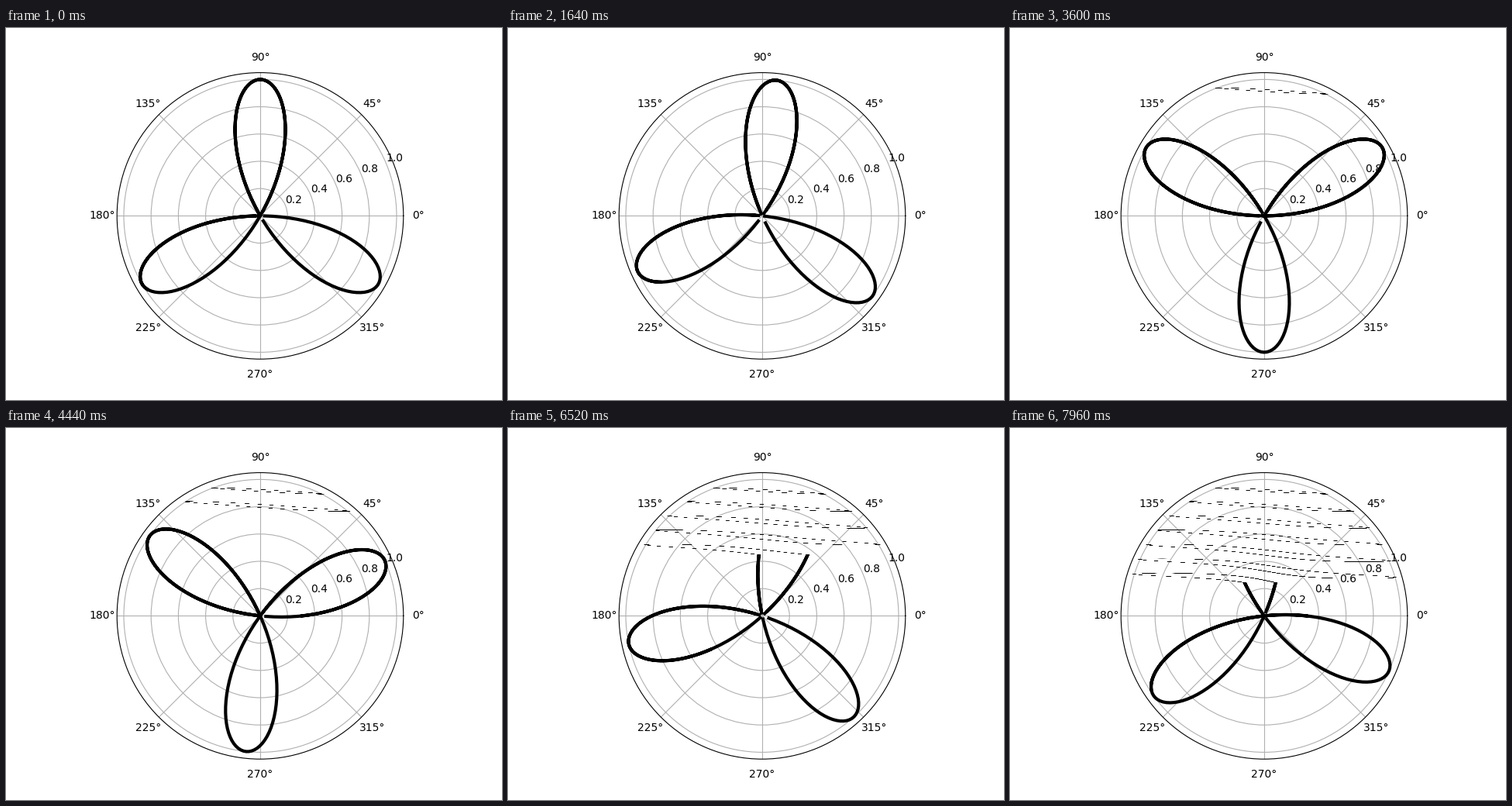
Recreate the animation shown at these times as a matplotlib script. Size 640 by 480 pixels, loop 8000 ms.

```python
import matplotlib.pyplot as plt
import numpy as np
from matplotlib.animation import FuncAnimation
from matplotlib.path import Path

WIDTH, HEIGHT, DPI = 640, 480, 100
FRAMES, INTERVAL = 200, 40
CYCLE = 20  # frames until the rose repeats

theta = np.linspace(0, 10, 500)


def rose(step):
    """Three-petalled rose, turning 6 degrees clockwise per step."""
    r = np.round(-np.sin(3 * theta + 2 * np.pi * step / CYCLE), 9)
    return np.where(r >= 0, r, np.nan)


def bands(spans):
    """Full-width strips between pixel rows, in figure coordinates."""
    polys = []
    for top, bottom in spans:
        y0, y1 = 1 - bottom / HEIGHT, 1 - top / HEIGHT
        polys.append([(0, y0), (1, y0), (1, y1), (0, y1)])
    return Path.make_compound_path_from_polys(np.array(polys))


fig = plt.figure(figsize=(WIDTH / DPI, HEIGHT / DPI), dpi=DPI)
ax = fig.add_subplot(projection="polar")
ax.set_ylim(0, 1.05)
ax.set_yticks([0.2, 0.4, 0.6, 0.8, 1.0])


def add_line(step):
    return ax.plot(theta, rose(step), color="black", lw=3)[0]


live = add_line(0)
frozen = [add_line(k) for k in range(CYCLE)]


def update(n):
    # A scan line moves down one pixel row per frame; rows it has
    # passed keep the picture they had at that moment.
    live.set_ydata(rose(n % CYCLE))
    live.set_clip_path(bands([(n, HEIGHT)]), fig.transFigure)
    for k, line in enumerate(frozen):
        rows = [(y, y + 1) for y in range(k, n, CYCLE) if y > 60]
        line.set_visible(bool(rows))
        if rows:
            line.set_clip_path(bands(rows), fig.transFigure)
    return [live, *frozen]


anim = FuncAnimation(fig, update, frames=FRAMES, interval=INTERVAL,
                     repeat=True, repeat_delay=0)
plt.show()
```
